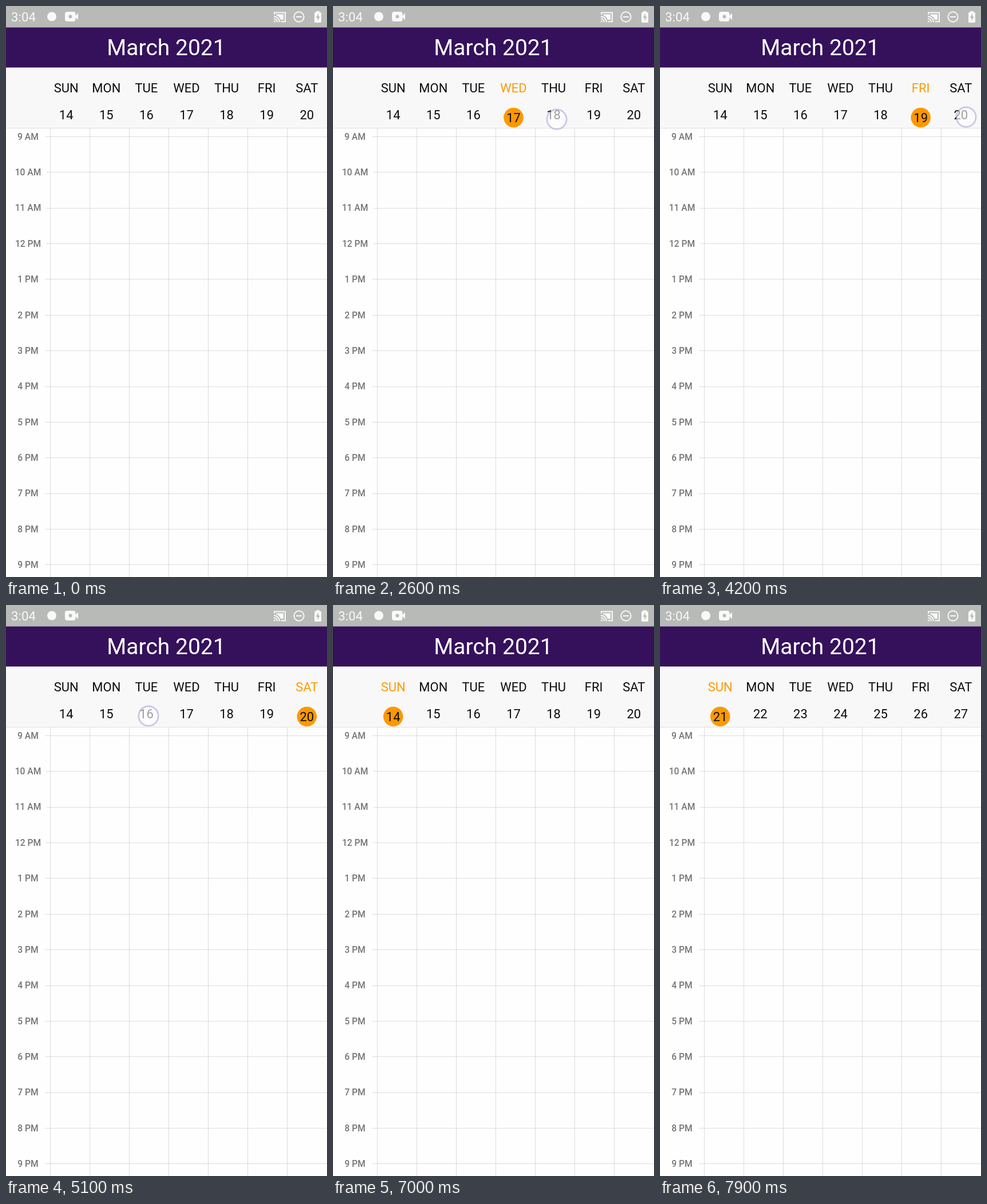
Write an HTML page that moves like this. It is 561 px wide and 998 px high and loops after 8 s.

```html
<!DOCTYPE html>
<html lang="en">
<head>
<meta charset="utf-8">
<title>Week calendar</title>
<style>
  html, body { margin: 0; width: 100%; height: 100%; overflow: hidden; background: #fdfefd; }
  svg { display: block; font-family: Roboto, sans-serif; }
  .mid { text-anchor: middle; }
  .hour { font-size: 15.6px; font-weight: 500; fill: #757575; }
  .day { font-size: 22px; fill: #0c0c0c; }
  .day.on .name { fill: #fb9a0a; }
  .day circle { fill: #fd9800; visibility: hidden; }
  .day.on circle { visibility: visible; }
  .grid { stroke: #000; stroke-opacity: .13; fill: none; }
</style>
</head>
<body>
<svg width="561" height="998" viewBox="0 0 561 998">
  <g id="pages"></g>
  <path fill="#f7f8f7" d="M0 107H561V213H0z"/>
  <path fill="#dfe0df" d="M0 213H561V214H0z"/>
  <path fill="#b8bab7" d="M0 0H561V38H0z"/>
  <path fill="#35115c" d="M0 37.5H561V107.5H0z"/>
  <text class="mid" x="280" y="86" font-size="39" fill="#fff">March 2021</text>
  <g fill="#f8f9f8">
    <text x="9" y="27" font-size="22.3">3:04</text>
    <circle cx="80" cy="18.5" r="8"/>
    <rect x="103" y="10" width="18.5" height="17" rx="4"/>
    <path d="M120 18.5L126 12.5V24.5z"/>
    <circle cx="112.5" cy="18.5" r="3" fill="#b8bab7"/>
    <path d="M472 14.5H485V24H480A12 12 0 0 0 472 16z"/>
    <path d="M468 25.5A3 3 0 0 1 471 28.3H468z"/>
    <path fill="none" stroke="#f8f9f8" stroke-width="2"
      d="M469 15V11.5H488V27.3H480.5M468 22.3A6 6 0 0 1 474 28.3M468 18.3A10 10 0 0 1 478 28.3M507 19H517"/>
    <circle cx="512" cy="19" r="8.7" fill="none" stroke="#f8f9f8" stroke-width="2"/>
    <rect x="539" y="11" width="12" height="18" rx="1.5"/>
    <path d="M542 9H548V12H542z"/>
    <path fill="#b8bab7" d="M546 13L541.7 20.5H544.5V26L548.6 18.5H546z"/>
  </g>
  <g id="days"></g>
  <g id="touch">
    <circle r="17.3" fill="#fff" fill-opacity=".6" stroke="#8f83cb" stroke-opacity=".16" stroke-width="3.6"/>
    <circle r="17" fill="none" stroke="#8f83cb" stroke-opacity=".4" stroke-width="1.8"/>
  </g>
</svg>
<script>
const LOOP = 8000, STEP = 100, WIDTH = 561;
const $ = id => document.getElementById(id);
const range = n => [...Array(n).keys()];

// Press start, release, day index, touch position
const taps = [
  [1600, 1800, 3, 319, 194],
  [2600, 2700, 4, 391, 198],
  [3300, 3400, 5, 466, 185],
  [4100, 4200, 6, 535, 194],
  [5100, 5200, 2, 249, 194],
  [6000, 6100, 1, 180, 193],
  [6700, 6800, 0, 108, 194]
];
const FADE = 200, SWIPE = 7200, FLING = 7300, NEW_WEEK = 7800;

const hourLabel = h => `${(h + 11) % 12 + 1} ${h < 12 ? 'AM' : 'PM'}`;
const page = left => {
  const rows = range(13).map(i => [i + 9, 228.5 + 62.36 * i]);
  const labels = rows.map(([h, y]) => `<text class="mid hour" x="38.5" y="${y + 5.2}">${hourLabel(h)}</text>`);
  const lines = rows.map(([h, y]) => `M${h % 12 > 9 || h === 12 ? 70 : 68} ${Math.floor(y) + .5}H${WIDTH}`);
  const columns = range(7).map(i => `M${Math.floor(77 + 69.1 * i) + .5} 213V998`);
  return `<g transform="translate(${left})">${labels.join('')}<path class="grid" d="${lines.concat(columns).join('')}"/></g>`;
};
$('pages').innerHTML = page(0) + page(WIDTH);

$('days').innerHTML = ['SUN', 'MON', 'TUE', 'WED', 'THU', 'FRI', 'SAT'].map((name, i) =>
  `<g class="day mid" transform="translate(${105.2 + 70.1 * i})"><circle cy="195" r="17.3"/>
   <text class="name" y="151">${name}</text><text class="date"></text></g>`).join('');
const days = [...document.querySelectorAll('.day')];

function scrollAt(t) {
  if (t < FLING) return 0;
  const rest = Math.max(0, 1 - (t - FLING) / 500);
  return WIDTH - 508 * rest ** 5;
}

function touchAt(t) {
  if (t >= SWIPE) return [346.5 - .7 * (t - FLING), 492.5, t <= FLING ? 1 : t < FLING + FADE ? .5 : 0];
  const tap = taps.findLast(([start]) => t >= start);
  if (!tap) return [0, 0, 0];
  const [, release, , x, y] = tap;
  return [x, y, Math.min(1, Math.max(0, 1 - (t - release) / FADE))];
}

function draw(now) {
  const t = Math.floor(now % LOOP / STEP) * STEP;
  const chosen = taps.findLast(([, release]) => t >= release + FADE)?.[2];
  const firstDate = t < NEW_WEEK ? 14 : 21;
  days.forEach((day, i) => {
    const on = i === chosen, date = day.querySelector('.date');
    day.classList.toggle('on', on);
    date.setAttribute('y', on ? 203 : 198);
    date.textContent = firstDate + i;
  });
  $('pages').setAttribute('transform', `translate(${-Math.round(scrollAt(t))})`);
  const [x, y, alpha] = touchAt(t);
  $('touch').setAttribute('transform', `translate(${x} ${y})`);
  $('touch').setAttribute('opacity', alpha);
}

const begin = performance.now();
function frame() {
  draw(performance.now() - begin);
  requestAnimationFrame(frame);
}
frame();
</script>
</body>
</html>
```
